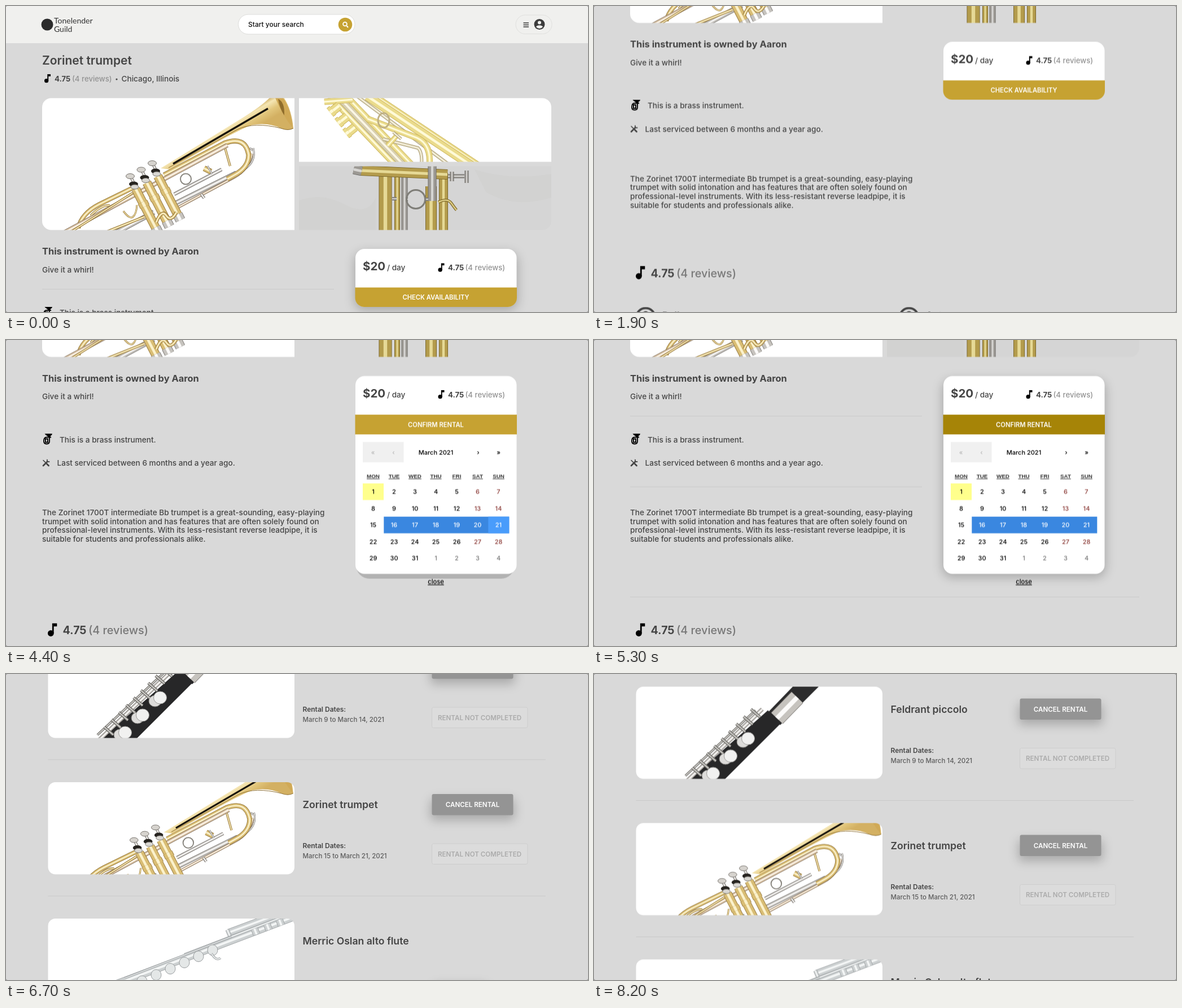
An HTML page that plays this animation: 1031x543 px, repeating every 8300 ms.

```html
<!DOCTYPE html>
<html lang="en">
<head>
<meta charset="utf-8">
<title>Instrument rental</title>
<style>
  html, body { margin: 0; width: 100%; height: 100%; overflow: hidden; background: #8c8c8c; }
  svg { display: block; width: 1031px; height: 543px; background: #d9d9d9; border-radius: 3px; }
  text { font: 500 13.6px Inter, sans-serif; fill: #454545; white-space: pre; }
  .title { font-size: 21px; font-weight: 600; }
  .owner { font-size: 16.4px; font-weight: 700; }
  .score { font-size: 13.2px; font-weight: 700; }
  .count { font-size: 13.2px; fill: #929292; }
  .price { font-size: 20.5px; font-weight: 700; }
  .btn { font-size: 11.2px; font-weight: 600; fill: #fff; text-anchor: middle; }
  .brand { font: 400 14px Lato, sans-serif; fill: #333; }
  .big .score { font-size: 19.6px; }
  .big .count { font-size: 19.8px; fill: #777; }
  .cal text { font-size: 11px; fill: #000; text-anchor: middle; }
  .cal .week { font: 700 9.8px "Liberation Sans", Arial, sans-serif; fill: #333; text-decoration: underline dotted; }
  .cal .end { fill: #8b3a36; }
  .cal .other { fill: #777; }
  .cal .off { fill: #b9b9b9; }
  .cal .link { font-size: 11.2px; text-decoration: underline; }
  .alert text { font: 400 11.3px Roboto, sans-serif; fill: #222; }
  .alert .key { font-size: 10.6px; font-weight: 500; text-anchor: middle; }
  .name { font-size: 17.6px; font-weight: 600; }
  .label { font-size: 12px; font-weight: 600; }
  .dates { font-size: 11.5px; fill: #5c5c5c; }
  .rule { stroke: #c9c9c9; stroke-width: 1; }
  .shade { filter: blur(9px); fill: #000; fill-opacity: .22; }
  .tube { fill: none; stroke-linejoin: round; }

  .detail, .rentals, .scroll, .list, .soft, .hard, .closed, .open, .shift,
  .range, .tip, .picked, .confirm, .alert { animation: 8300ms step-end infinite; }
  .scroll  { animation-name: scroll; }
  .list    { animation-name: list; }
  .detail  { animation-name: leave; }
  .rentals { animation-name: arrive; }
  .soft    { animation-name: soft; }
  .hard    { animation-name: hard; }
  .closed  { animation-name: closed; }
  .open    { animation-name: open; }
  .shift   { animation-name: shift; }
  .range   { animation-name: range; }
  .tip     { animation-name: tip; }
  .cal .picked { animation-name: picked; }
  .confirm { animation-name: confirm; }
  .alert   { animation-name: alert; }

  @keyframes scroll {
    0%      { transform: translateY(0); animation-timing-function: steps(3); }
    3.59%   { transform: translateY(-62px); animation-timing-function: steps(4); }
    8.41%   { transform: translateY(-188px); animation-timing-function: steps(3); }
    12.02%  { transform: translateY(-261px); animation-timing-function: steps(4); }
    16.84%  { transform: translateY(-338px); animation-timing-function: steps(5); }
    22.86%, 100% { transform: translateY(-367.5px); }
  }
  @keyframes list {
    0%, 80.7% { transform: translateY(-50px); animation-timing-function: steps(8); }
    90.33%  { transform: translateY(-46.5px); animation-timing-function: steps(2); }
    92.74%  { transform: translateY(-2px); animation-timing-function: steps(2); }
    95.15%  { transform: translateY(17px); animation-timing-function: steps(3); }
    98.76%, 100% { transform: translateY(22.5px); }
  }
  @keyframes leave  { 0% { visibility: visible } 80.7%, 100% { visibility: hidden } }
  @keyframes arrive { 0% { visibility: hidden } 80.7%, 100% { visibility: visible } }
  @keyframes soft   { 0% { opacity: 1 } 10.8% { opacity: 0 } 63.83%, 100% { opacity: 1 } }
  @keyframes hard   { 0% { opacity: 1 } 63.83%, 100% { opacity: 0 } }
  @keyframes closed { 0% { opacity: 1 } 30.09%, 100% { opacity: 0 } }
  @keyframes open   { 0% { opacity: 0 } 30.09%, 100% { opacity: 1 } }
  @keyframes shift  { 0% { transform: translateY(0) } 30.09%, 100% { transform: translateY(41px) } }
  @keyframes range {
    0%     { width: 0; fill: #e6e6e6 }
    36.12% { width: 37px; fill: #e6e6e6 }
    42.14% { width: 37px; fill: #e6e6e6; animation-timing-function: steps(5) }
    48.16% { width: 222px; fill: #e6e6e6 }
    51.78%, 100% { width: 222px; fill: #3a87e0 }
  }
  @keyframes tip     { 0% { opacity: 0 } 51.78% { opacity: 1 } 60.22%, 100% { opacity: 0 } }
  @keyframes picked  { 51.78%, 100% { fill: #fff } }
  @keyframes confirm { 0% { fill: #c6a232 } 63.83%, 100% { fill: #a68407 } }
  @keyframes alert   { 0% { opacity: 0 } 69.85% { opacity: 1 } 80.7%, 100% { opacity: 0 } }
</style>
</head>
<body>
<svg viewBox="0 0 1031 543">
  <defs>
    <linearGradient id="bell" gradientUnits="userSpaceOnUse" x1="372" y1="218" x2="390" y2="248">
      <stop offset="0" stop-color="#c9a556"/><stop offset=".25" stop-color="#f5e6b4"/>
      <stop offset=".6" stop-color="#e2c67c"/><stop offset="1" stop-color="#d3b062"/>
    </linearGradient>
    <clipPath id="main"><path d="M511 163.5V397.5H80a16 16 0 0 1-16-16V179.5a16 16 0 0 1 16-16Z"/></clipPath>
    <clipPath id="upper"><path d="M519 163.5H950a16 16 0 0 1 16 16V276.5H519Z"/></clipPath>
    <clipPath id="lower"><path d="M519 284.5H966V381.5a16 16 0 0 1-16 16H519Z"/></clipPath>
    <clipPath id="thumb"><rect x="74.5" width="436.5" height="163.5" rx="13"/></clipPath>
    <g id="note"><circle cx="3.6" cy="11.7" r="3.6"/><path d="M5.3 0H11V3.7H7.2V12H5.3Z"/></g>
    <g id="person">
      <circle r="9.5" fill="#3c3c3c"/><circle cy="-3" r="3" fill="#f0f0ee"/>
      <path d="M-6 4.5Q-4.5 1.7 0 1.7T6 4.5Q3.5 7.5 0 7.5T-6 4.5Z" fill="#f0f0ee"/>
    </g>
    <g id="face">
      <circle r="16.8" fill="none" stroke="#444" stroke-width="3.8"/><circle cy="-5" r="6.5" fill="#444"/>
      <path d="M-11 10Q0 0 11 10Q0 18-11 10Z" fill="#444"/>
    </g>
    <g id="trumpet"></g>
  </defs>

  <g class="detail">
    <g class="scroll">
      <rect width="1031" height="66" fill="#f0f0ee"/>
      <circle cx="73" cy="33" r="10.5" fill="#2b2b2b"/>
      <text class="brand" x="85" y="31">Tonelender</text>
      <text class="brand" x="85" y="45.5">Guild</text>
      <rect x="411.5" y="15" width="206.5" height="35" rx="17.5" fill="#fff" stroke="#dcdcda"/>
      <text x="429" y="37" style="font-size:12px;fill:#111">Start your search</text>
      <circle cx="601" cy="33" r="12.3" fill="#c6a232"/>
      <path d="M603.5 35.3L606 38" stroke="#fff" stroke-width="2"/>
      <circle cx="600.5" cy="32" r="3.4" fill="none" stroke="#fff" stroke-width="1.8"/>
      <rect x="903" y="16" width="64" height="33.5" rx="16.7" fill="#f0f0ee" stroke="#e0e0de"/>
      <path d="M916.5 30h9.5m-9.5 3.5h9.5m-9.5 3.5h9.5" stroke="#333" stroke-width="1.4"/>
      <use href="#person" x="945" y="32.5"/>

      <text class="title" x="64" y="104">Zorinet trumpet</text>
      <use href="#note" x="68" y="121"/>
      <text class="score" x="86" y="134">4.75</text>
      <text class="count" x="117" y="134">(4 reviews)</text>
      <circle cx="196" cy="130" r="1.6" fill="#454545"/>
      <text x="204.5" y="134">Chicago, Illinois</text>

      <g clip-path="url(#main)">
        <path d="M64 163H511V398H64Z" fill="#fff"/><use href="#trumpet"/>
      </g>
      <g clip-path="url(#upper)">
        <path d="M519 163H966V277H519Z" fill="#fff"/><g id="slides"></g>
      </g>
      <g clip-path="url(#lower)">
        <g class="soft">
          <path d="M519 284H966V398H519Z" fill="#d5d5d5"/>
          <path d="M519 345Q560 330 600 352T655 340V398H519ZM830 290Q890 310 966 298V340Q900 360 850 330Z" fill="#d2d2d1"/>
        </g>
        <g id="valves"></g>
      </g>

      <text class="owner" x="64" y="441">This instrument is owned by Aaron</text>
      <text x="64" y="472.5">Give it a whirl!</text>
      <path class="rule soft" d="M64 502.5H581M64 628H581"/>
      <g transform="translate(65 535)" fill="none" stroke="#000" stroke-width="1.9">
        <path d="M5 0H16Q12 2 12 5V12Q12 17 7 17T2 12Q2 5 7 5H15M5 10V14H9V8H5Z"/>
        <path d="M6 0H15L11 4Z" fill="#000"/>
      </g>
      <text x="95" y="549">This is a brass instrument.</text>
      <g transform="translate(64 579)" stroke="#444" stroke-linecap="round">
        <path d="M2 2L7 7" stroke-width="1.6"/><path d="M8.5 8.5L11.5 11.5M2 11.5L9 4.5" stroke-width="2.8"/>
        <path d="M9 1Q8 5 12.5 4.5" fill="none" stroke-width="1.8"/>
      </g>
      <text x="90.5" y="590.5">Last serviced between 6 months and a year ago.</text>
      <text x="64" y="678.5">The Zorinet 1700T intermediate Bb trumpet is a great-sounding, easy-playing</text>
      <text x="64" y="694.2">trumpet with solid intonation and has features that are often solely found on</text>
      <text x="64" y="709.8">professional-level instruments. With its less-resistant reverse leadpipe, it is</text>
      <text x="64" y="725.5">suitable for students and professionals alike.</text>

      <g class="shift big">
        <path class="rule soft" d="M64 782H966"/>
        <use href="#note" transform="translate(74 829) scale(1.48 1.53)"/>
        <text class="score" x="100.5" y="848.5">4.75</text>
        <text class="count" x="146" y="848.5">(4 reviews)</text>
        <use href="#face" x="91.500" y="920.5"/>
        <use href="#face" x="558" y="920.5"/>
        <text class="owner" x="121" y="921.5">Della</text>
        <text class="owner" x="588" y="921.5">Anton</text>
      </g>

      <g class="closed">
        <rect class="shade soft" x="617" y="437" width="289.5" height="103" rx="18"/>
        <rect x="619" y="431" width="285.5" height="103" rx="16" fill="#fff"/>
        <path d="M618.5 499.5H905V518a16 16 0 0 1-16 16H634.5a16 16 0 0 1-16-16Z" fill="#c6a232"/>
        <text class="btn" x="761.5" y="521">CHECK AVAILABILITY</text>
      </g>
      <g class="open">
        <rect class="shade soft" x="617" y="438" width="289.5" height="351" rx="18"/>
        <rect class="hard" x="620" y="460" width="281" height="331" rx="24" fill="#b2b2b2"/>
        <rect x="619" y="431.5" width="285.5" height="351" rx="16" fill="#fff"/>
        <path class="confirm" d="M618.5 500H905V535H618.5Z"/>
        <text class="btn" x="761.5" y="521.5">CONFIRM RENTAL</text>
        <g class="cal" transform="translate(0 367.5)">
          <rect x="632" y="181" width="72.5" height="36" fill="#f0f0f0"/>
          <text class="off" x="650" y="203">«</text><text class="off" x="686.5" y="203">‹</text>
          <text x="761.5" y="203">March 2021</text>
          <text x="836.5" y="203">›</text><text x="872.5" y="203">»</text>
          <rect x="632" y="254.5" width="37" height="29.5" fill="#ffff8c"/>
          <rect class="range" x="669.3" y="313.5" width="0" height="29.5"/>
          <rect class="tip" x="854.3" y="313.5" width="37" height="29.5" fill="#499cfb"/>
          <g id="days"></g>
          <text class="link" x="761.5" y="433">close</text>
        </g>
      </g>
      <text class="price" x="632" y="469">$20</text>
      <text x="675" y="469">/ day</text>
      <use href="#note" x="765.5" y="456.5"/>
      <text class="score" x="783" y="469">4.75</text>
      <text class="count" x="813.5" y="469">(4 reviews)</text>
    </g>

    <g class="alert">
      <rect class="shade" x="335" y="-30" width="371" height="111"/>
      <rect x="337" y="-30" width="367" height="107" rx="3" fill="#fff"/>
      <text x="350.5" y="20">Are you sure you would like to book this rental?</text>
      <rect x="566.5" y="38" width="58.5" height="25.5" rx="3" fill="#fff" stroke="#ececec"/>
      <text class="key" x="595.5" y="54" style="fill:#4a80cf">Cancel</text>
      <rect x="632" y="38" width="58.5" height="25.5" rx="3" fill="#6597df" stroke="#5484cc"/>
      <text class="key" x="661" y="54" style="fill:#fff">OK</text>
    </g>
  </g>

  <g class="rentals"><g class="list" id="list"></g></g>
</svg>

<script>
const tones = {
  gold: ['#8c6d30', '#d9bd74', '#fbf2cd'],
  rose: ['#83705a', '#d6bfa2', '#fdf7ec'],
  silver: ['#6c6864', '#c6c3be', '#fbfaf9'],
  pale: ['#cbb254', '#eadb8c', '#fffad8'],
  mist: ['#a99c78', '#d8cfae', '#faf6e6'],
  olive: ['#6e5c24', '#b39b4c', '#e6d996'],
  steel: ['#62615d', '#9c9994', '#d6d5d2'],
  cloud: ['#9da1a3', '#ccd0d1', '#f3f5f5']
};
const put = (id, ...parts) => document.getElementById(id).innerHTML = parts.flat().join('');
const shape = (d, fill) => `<path d="${d}" fill="${fill}"/>`;
const disc = (x, y, rx, ry, fill, edge = 'none') =>
  `<ellipse cx="${x}" cy="${y}" rx="${rx}" ry="${ry}" fill="${fill}" stroke="${edge}"/>`;

// A shaded pipe: dark edge, body and a bright streak
function tube(d, width, tone) {
  const widths = [width, Math.max(width - 1.6, width * .6), width * .28];
  return tones[tone].map((c, i) =>
    `<path class="tube" d="${d}" stroke="${c}" stroke-width="${widths[i]}"/>`).join('');
}

const pistons = [0, 1, 2].map(i => {
  const x = 221 + i * 19.5, y = 303 - i * 11.5;
  return tube(`M${x + 9} ${y + 22}L${x + 48} ${y + 98}`, 16, 'gold')
    + tube(`M${x + 21} ${y + 45}l4 8`, 18, 'gold')
    + tube(`M${x + 44} ${y + 90}L${x + 49} ${y + 100}`, 18, 'silver')
    + tube(`M${x} ${y}L${x + 6} ${y + 12}`, 5, 'silver')
    + disc(x + 5, y + 13, 8, 4.5, '#26231f') + disc(x + 7, y + 18, 7, 4, '#d9d7d2', '#77736d')
    + disc(x - 1, y - 1, 7.5, 4.5, '#d6d3ce', '#77736d');
});

put('trumpet',
  tube('M195 402L262 366', 9, 'silver'),
  tube('M180 400L245 374', 5, 'gold'),
  tube('M296 352L408 296', 8, 'silver'),
  tube('M298 334L382 290', 6, 'silver'),
  tube('M296 362L404 304Q430 290 436 262', 5, 'rose'),
  tube('M438 252Q444 276 422 290M437 256l-5-4', 3, 'silver'),
  tube('M346 334l5 7', 5, 'silver'),
  tube('M128 394Q134 368 165 352L226 322', 8, 'gold'),
  tube('M150 372Q170 352 184 354', 4, 'gold'),
  tube('M388 252L397 284', 4, 'gold'),
  tube('M280 300L388 243Q424 230 430 264Q430 285 408 298L392 307', 9, 'gold'),
  shape('M274 288L420 198Q452 178 468 162H492Q506 184 509 217Q500 222 487 217Q465 206 436 211Q410 219 290 290Z', 'url(#bell)'),
  '<path d="M288 287L410 219Q440 205 487 217Q500 222 509 217" fill="none" stroke="#8c6d30"/>',
  shape('M477 163H491Q504 182 507 215Q490 194 477 163Z', '#d0a956'),
  shape('M482 165Q494 170 493 194Q485 183 482 165Z', '#8f6d2c'),
  '<path d="M296 280L464 182" stroke="#17130c" stroke-width="3.2"/>',
  tube('M103 402L392 247', 8, 'rose'),
  tube('M118 399L224 332', 4, 'gold'),
  pistons,
  tube('M266 384Q276 360 284 372T302 366', 6, 'gold'),
  tube('M208 364Q219 379 225 374T232 353', 3, 'gold'),
  '<circle cx="318.5" cy="307" r="9.5" fill="none" stroke="#88857e" stroke-width="2"/>',
  tube('M351 288l12 6', 10, 'gold'), tube('M357 284l8 14', 3, 'silver')
);

// Parallel pipes running down to the right
const slant = (x, reach, width, tone) => tube(`M${x} 160L${x + reach} 284`, width, tone);

put('slides',
  slant(655, 186, 9, 'pale'), slant(640, 186, 16, 'pale'), slant(622, 166, 6, 'mist'),
  slant(574, 118, 12, 'pale'), slant(588, 118, 13, 'mist'), slant(603, 118, 11, 'pale'),
  tube('M640 200L728 234Q754 246 750 284', 11, 'pale'),
  tube('M668 236L730 252Q738 260 736 284', 6, 'mist'),
  tube('M676 248L694 228', 9, 'pale'), tube('M686 224l14 12', 5, 'mist'),
  tube('M564 170L614 166', 11, 'pale'),
  [0, 1, 2].map(i => tube(`M${590 + i * 14} ${177 + i * 19}l-15 12`, 16, 'pale')
    + tube(`M${579 + i * 14} ${185 + i * 19}l-5 4`, 19, 'pale')),
  '<ellipse cx="669" cy="203" rx="10" ry="13" fill="none" stroke="#c0b184" stroke-width="3"/>'
);

put('valves',
  tube('M672 296V400', 23, 'olive'),
  tube('M693 300V400', 10, 'olive'), tube('M706 296V400', 11, 'steel'),
  tube('M775 296V400', 16, 'olive'), tube('M753 320V400', 20, 'olive'),
  tube('M628 292L782 299', 18, 'olive'),
  tube('M616 290L630 293', 17, 'steel'),
  tube('M755 280V346', 15, 'steel'),
  tube('M783 302H812', 7, 'steel'), tube('M790 294V311M816 292V314', 7, 'steel'),
  tube('M684 342h8M708 343h4M742 343h6', 6, 'steel'),
  tube('M766 348Q782 340 789 350T798 362', 5, 'olive'),
  '<circle cx="726" cy="343" r="16.5" fill="none" stroke="#7f7e78" stroke-width="3"/>'
);

// Calendar: weekday heads, then five rows starting on Monday the 1st
const center = i => 650.5 + 37 * (i % 7);
put('days',
  ['MON', 'TUE', 'WED', 'THU', 'FRI', 'SAT', 'SUN'].map((d, i) =>
    `<text class="week" x="${center(i)}" y="245">${d}</text>`),
  Array.from({ length: 35 }, (_, i) => {
    const kind = i > 30 ? 'other' : i % 7 > 4 ? 'end' : '';
    const picked = i > 14 && i < 21 ? 'picked' : '';
    return `<text class="${kind} ${picked}" x="${center(i)}" y="${273 + 29.5 * Math.floor(i / 7)}">${i % 31 + 1}</text>`;
  })
);

const piccolo = shape('M354 -2H400L330 68L302 52Z', '#2c2c2d')
  + tube('M360 19L324 56', 29, 'silver')
  + shape('M308 42L332 64L226 170H164Z', '#272728')
  + tube('M298 40L164 168', 7, 'silver') + tube('M286 42L162 158', 4, 'steel')
  + Array.from({ length: 9 }, (_, i) => tube(`M${278 - i * 13} ${40 + i * 13}l16 14`, 5, 'steel')).join('')
  + [0, 1, 2].map(i => disc(264 - i * 31, 98 + i * 30, 11, 10, '#dddcda', '#83817e')
    + disc(273 - i * 31, 92 + i * 31, 11.5, 11, '#f1f1f0', '#9b9a98')).join('');

const flute = tube('M512 -4L196 116', 14, 'cloud')
  + tube('M394 25L472 -4', 13, 'cloud') + tube('M392 20l5 12', 7, 'cloud')
  + tube('M488 -2L316 64', 5, 'cloud') + tube('M400 32L210 106', 3, 'cloud')
  + [0, 1, 2].map(i => tube(`M${440 + i * 22} ${18 - i * 8}l4 10`, 13, 'cloud')).join('')
  + Array.from({ length: 7 }, (_, i) => disc(366 - i * 25, 56 + i * 11, 9, 9.5, '#e4e7e7', '#999d9f')).join('')
  + tube('M364 62Q372 76 380 70', 4, 'cloud');

const horn = '<use href="#trumpet" transform="translate(74.5 81.75) scale(.976) translate(-64 -280.5)"/>';

function rental(i, name, dates, art) {
  const actions = dates
    ? `<rect class="shade" x="752" y="30" width="149" height="37.5" rx="6"/>
       <rect x="754.5" y="21" width="144" height="37.5" rx="3" fill="#949494"/>
       <text class="btn" x="826.5" y="44" style="font-size:11.6px">CANCEL RENTAL</text>
       <rect x="754.5" y="109" width="169.5" height="36.5" rx="3" fill="#dcdcdc" stroke="#cdcdcd"/>
       <text class="btn" x="839" y="131.5" style="font-size:11.6px;fill:#ababab">RENTAL NOT COMPLETED</text>
       <text class="label" x="525.5" y="117">Rental Dates:</text>
       <text class="dates" x="525.5" y="135">${dates}</text>`
    : '<rect class="shade" x="758" y="118" width="94" height="37.5" rx="6"/>';
  return `<g transform="translate(0 ${i * 242})">
    <g clip-path="url(#thumb)"><path d="M74 0H511V164H74Z" fill="#fff"/>${art}</g>
    <text class="name" x="525.5" y="46">${name}</text>${actions}
    <path class="rule" d="M74.5 202H956"/></g>`;
}

put('list',
  rental(0, 'Feldrant piccolo', 'March 9 to March 14, 2021', piccolo),
  rental(1, 'Zorinet trumpet', 'March 15 to March 21, 2021', horn),
  rental(2, 'Merric Oslan alto flute', '', flute)
);
</script>
</body>
</html>
```
